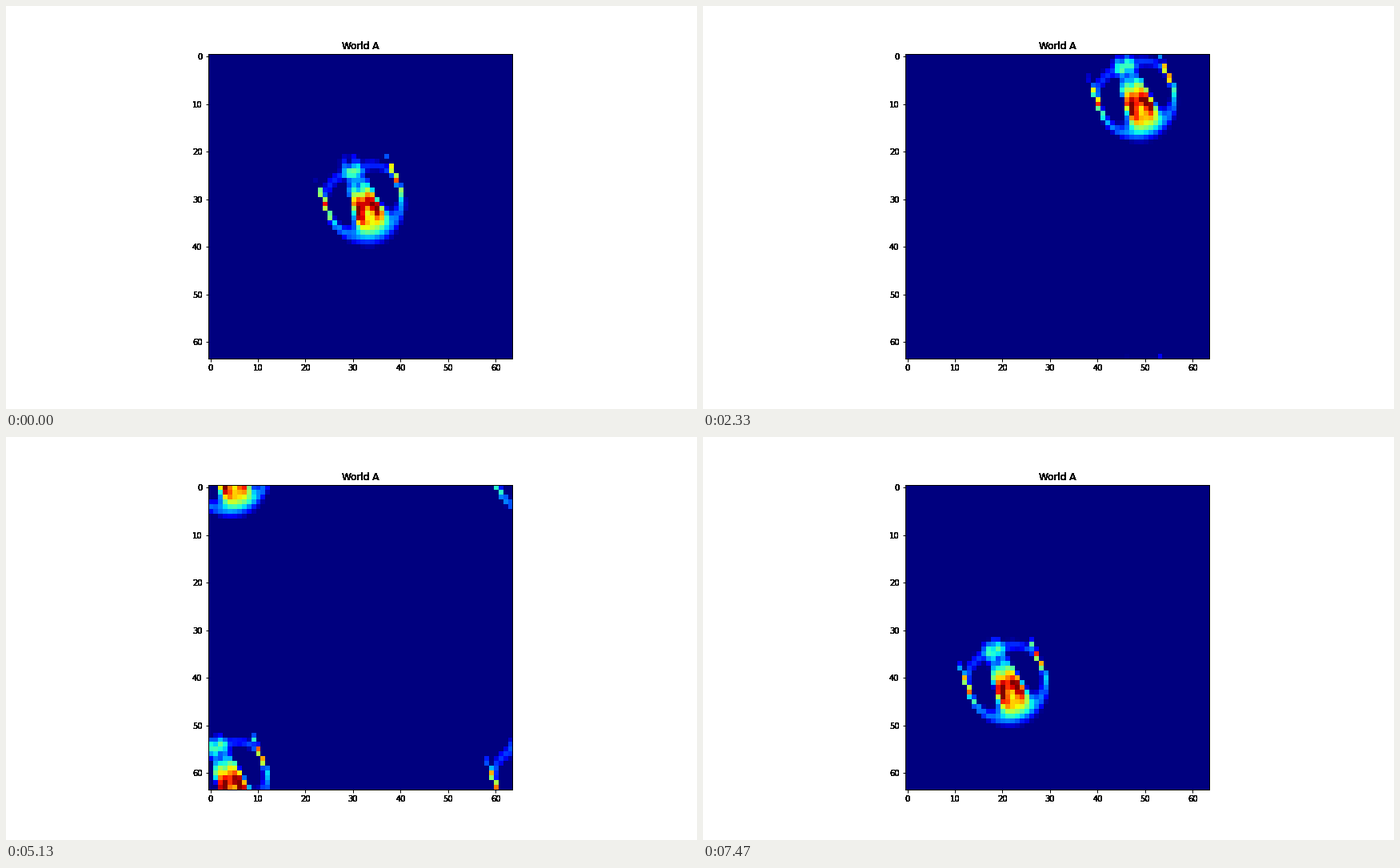
Recreate the animation shown at these times as a matplotlib script. Size 864 by 504 pixels, loop 7.54 s.

```python
"""A Lenia glider crossing a 64 x 64 torus."""
import matplotlib.pyplot as plt
import numpy as np
from matplotlib.animation import FuncAnimation

N, RADIUS, MU, SIGMA, DT = 64, 13, 0.15, 0.015, 0.1
FRAMES, LOOP_MS, SETTLE = 113, 7540, 60
HOME = 30.4 + 30.18j       # centre of mass at step 0, x + iy
VELOCITY = 0.219 + 0.5625j  # cells per step
TAU = 2 * np.pi

Y, X = np.mgrid[:N, :N]


def step_at(frame):
    """World steps run at 33.3 per second, shown at 15 pictures per second."""
    return 2 + (20 * frame + 9) // 9


STEPS = step_at(FRAMES - 1) + 1


def bell(x, m, s):
    return np.exp(-((x - m) / s) ** 2 / 2)


def make_kernel():
    dist = np.hypot(X - N // 2, Y - N // 2) / RADIUS
    ring = (dist < 1) * bell(dist, 0.5, 0.15)
    return np.fft.fft2(np.fft.fftshift(ring / ring.sum()))


KERNEL = make_kernel()


def wrap(d):
    return (d + N / 2) % N - N / 2


def wrap_both(z):
    return wrap(z.real) + 1j * wrap(z.imag)


def step(world):
    u = np.fft.ifft2(KERNEL * np.fft.fft2(world)).real
    growth = 2 * bell(u, MU, SIGMA) - 1
    return np.clip(world + DT * growth, 0, 1)


def seed(pos, turn, shape):
    """A thin ring, a leaning body and a lobe; the rule sharpens them."""
    ring, radius, length, width, lean, lobe = shape
    z = wrap_both(X + 1j * Y - pos) * np.exp(-1j * turn)
    x, y = z.real, z.imag
    world = ring * bell(np.hypot(x + 0.5, y + 0.7), radius, 0.8)
    world += bell(y, 1.6, length) * bell(x, lean * y, width)
    world += lobe * bell(x, -3.2, 1.6) * bell(y, -7.6, 1.6)
    return np.minimum(world, 1)


def centre(world):
    """Centre of mass on the torus, as x + iy."""
    cx, cy = (np.angle((world * np.exp(1j * TAU * axis / N)).sum()) * N / TAU
              for axis in (X, Y))
    return cx + 1j * cy


def drift(shape, span=20):
    """Mean velocity once settled, or 0 if the shape died or spread."""
    world, start = seed(HOME, 0, shape), 0
    for i in range(SETTLE + span):
        if i == SETTLE:
            start = centre(world)
        world = step(world)
        if not 30 < world.sum() < 150:
            return 0
    return wrap_both(centre(world) - start) / span


def find_shape(tries=150):
    """Vary the sketch more and more until it glides as wanted."""
    rng = np.random.default_rng(4)
    sketch = np.array([0.16, 8, 3.8, 2.1, 0.36, 0.34])
    best, least = sketch, np.inf
    for i in range(tries):
        shape = sketch * rng.normal(1, 0.0015 * i, sketch.size)
        error = abs(drift(shape) / VELOCITY - 1)
        if error < least:
            best, least = shape, error
        if least < 0.15:
            break
    return best


def run(world):
    for _ in range(SETTLE):
        world = step(world)
    worlds = [world]
    while len(worlds) < STEPS:
        worlds.append(step(worlds[-1]))
    return worlds


def track(worlds):
    c = np.array([centre(w) for w in worlds])
    return np.unwrap(c.real, period=N) + 1j * np.unwrap(c.imag, period=N)


def fly(rounds=12):
    """Aim the glider so that it follows the straight path from HOME."""
    shape = find_shape()
    path = HOME + VELOCITY * np.arange(STEPS)
    pos, turn = HOME - VELOCITY * SETTLE, 0.0
    best, least = None, np.inf
    for _ in range(rounds):
        worlds = run(seed(pos, turn, shape))
        way = track(worlds)
        gap = path - way
        shift = wrap_both(gap.mean())
        error = np.abs(gap - gap.mean() + shift).max()
        if best is None or error < least:
            best, least = worlds, error
        turn += np.angle((path[-1] - path[0]) * np.conj(way[-1] - way[0]))
        pos += shift
    return best


WORLDS = fly()

plt.rcParams["font.family"] = "DejaVu Sans"
fig = plt.figure(figsize=(12, 7), dpi=72, facecolor="white")
fig.subplots_adjust(left=0.125, right=0.9, bottom=0.125, top=0.88)
ax = fig.add_subplot()
image = ax.imshow(WORLDS[0], cmap="jet", vmin=0, vmax=1,
                  interpolation="nearest")
ticks = range(0, N, 10)
ax.set_xticks(ticks)
ax.set_yticks(ticks)
ax.tick_params(width=1, labelbottom=False, labelleft=False)
for spine in ax.spines.values():
    spine.set_linewidth(1)


def heavy_text(x, y, text, transform, va, ha, size=10):
    """Stack copies so that the soft glyph edges turn solid."""
    for _ in range(12):
        ax.text(x, y, text, transform=transform, va=va, ha=ha, size=size)


below, left = ax.get_xaxis_text1_transform(7), ax.get_yaxis_text1_transform(7)
for t in ticks:
    heavy_text(t, 0, str(t), *below)
    heavy_text(0, t, str(t), *left)
heavy_text(0.5, 1, "World A", ax.title.get_transform(), "baseline", "center", 12)


def update(i):
    image.set_data(WORLDS[step_at(i)])
    return (image,)


anim = FuncAnimation(fig, update, frames=FRAMES, interval=LOOP_MS / FRAMES,
                     repeat=True, repeat_delay=0)
plt.show()
```
